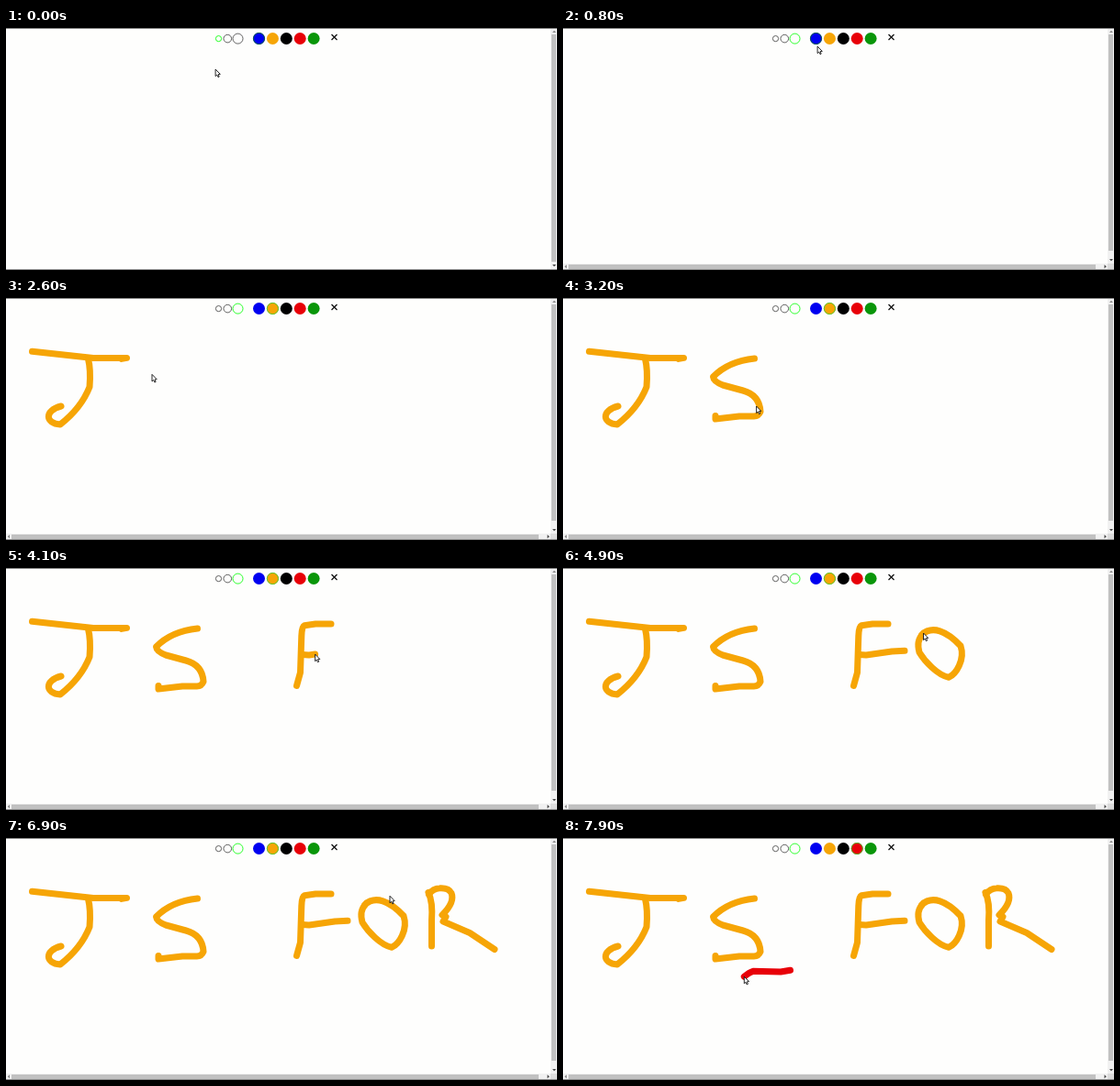
These frames come from a looping animation (600 px wide and 264 px high, 8000 ms). An HTML page with a canvas:

```html
<!DOCTYPE html>
<html lang="en">
<head>
<meta charset="utf-8">
<title>Drawing board</title>
<style>
html, body { margin: 0; width: 100%; height: 100%; overflow: hidden; background: #fefefd; }
canvas { display: block; width: 600px; height: 264px; }
</style>
</head>
<body>
<canvas id="board" width="600" height="264"></canvas>
<script>
const ctx = document.getElementById('board').getContext('2d');
const LOOP = 8000, STEP = 100;
const LARGE_AT = 500, ORANGE_AT = 1200, RED_AT = 7300;
const ORANGE = '#f6a506', RED = '#e80008', LIME = '#1f1';
const COLORS = ['#0000f0', ORANGE, '#000', RED, '#0a960a'];
const ARROW = new Path2D('M0 0V7.6L1.7 6.1 2.9 8.7 4.1 8.1 3 5.6 5.2 5.4Z');
const CROSS = new Path2D('M354.5 7l6 6m0-6l-6 6');

// The pointer follows a path from start to end; with a colour it leaves ink
function stroke(start, end, d, color) {
  const path = document.createElementNS('http://www.w3.org/2000/svg', 'path');
  path.setAttribute('d', d);
  return { start, end, color, path, shape: new Path2D(d), length: path.getTotalLength() };
}
const hover = (t, x, y) => stroke(t, t, `M${x} ${y}h.1`);

const moves = [
  hover(0, 228, 45),
  hover(LARGE_AT, 252, 13),
  hover(800, 277, 20),
  hover(1000, 321, 20),
  hover(ORANGE_AT, 290, 13),
  stroke(1450, 1800, 'M28.5 58.3L95 65.4H131.5L126 66.4', ORANGE),
  stroke(2000, 2500, 'M89.5 66.5Q92.5 78 91 97Q82 120 59 138C43 137 41 123 60 118', ORANGE),
  stroke(2650, 3100, 'M208.5 66Q180 69 163.5 86Q164 91 174 95L196 101Q214 106 215 124Q213 129 208 129H192L166 132V128.5', ORANGE),
  hover(3200, 210.5, 118),
  stroke(3600, 3950, 'M354 61H337L325 62.7Q322 64 321.8 74L320.5 114 316.5 128.5', ORANGE),
  stroke(4050, 4230, 'M323 94.5L330 95 358 91 372 90.3', ORANGE),
  stroke(4300, 4900, 'M390.5 73C402 62 418 69 433 85C438 100 428 116 420 119.3C408 117 394 102 388 92C386 84 386 78 392.5 71', ORANGE),
  stroke(5050, 5380, 'M460 59.5Q465 70 463.5 90V118', ORANGE),
  stroke(5600, 6700, 'M460.5 61.5Q465 55 472 54.7Q482 54 485 60Q489 70 475 84L479 86 476 91 505 103.5 532 121.5', ORANGE),
  hover(7100, 304, 5),
  hover(7200, 342, 10),
  hover(RED_AT, 320, 13),
  stroke(7600, 7900, 'M247.5 144.3L237 146 207 145.3Q203 146.5 197.3 151.2', RED)
];

const progress = (m, t) => t >= m.end ? 1 : (t - m.start) / (m.end - m.start);

function rect(x, y, w, h, color) {
  ctx.fillStyle = color;
  ctx.fillRect(x, y, w, h);
}

function disc(x, y, r, fill, line) {
  ctx.beginPath();
  ctx.arc(x, y, r, 0, Math.PI * 2);
  if (fill) { ctx.fillStyle = fill; ctx.fill(); }
  if (line) { ctx.strokeStyle = line; ctx.lineWidth = 0.9; ctx.stroke(); }
}

// Scrollbar arrow pointing along (dx, dy)
function marker(x, y, dx, dy, color) {
  ctx.beginPath();
  ctx.moveTo(x + dx * 1.3, y + dy * 1.3);
  ctx.lineTo(x - dx + dy * 2, y - dy + dx * 2);
  ctx.lineTo(x - dx - dy * 2, y - dy - dx * 2);
  ctx.fillStyle = color;
  ctx.fill();
}

function drawInk(t) {
  ctx.save();
  ctx.lineWidth = 7;
  ctx.lineCap = ctx.lineJoin = 'round';
  for (const m of moves) {
    if (!m.color || t < m.start) continue;
    const share = progress(m, t);
    ctx.setLineDash(share < 1 ? [m.length * share, m.length * 2] : []);
    ctx.strokeStyle = m.color;
    ctx.stroke(m.shape);
  }
  ctx.restore();
}

function pointer(t) {
  const n = moves.findLastIndex(m => m.start <= t);
  const now = moves[n], next = moves[n + 1];
  const a = now.path.getPointAtLength(now.length * progress(now, t));
  if (t <= now.end || !next) return [a.x, a.y];
  const b = next.path.getPointAtLength(0);
  const k = (t - now.end) / (next.start - now.end);
  return [a.x + (b.x - a.x) * k, a.y + (b.y - a.y) * k];
}

function drawTools(t) {
  const size = t < LARGE_AT ? 0 : 2;
  const color = t < ORANGE_AT ? 0 : t < RED_AT ? 1 : 3;
  for (let i = 0; i < 3; i++) {
    disc(231.5 + i * (9 + i * 0.75), 11.6, 3.1 + i * 1.2, null, i === size ? LIME : '#505050');
  }
  COLORS.forEach((fill, i) => {
    const x = 275.5 + i * 14.9;
    disc(x, 11.5, 6.5, fill);
    if (i === color) disc(x, 11.5, 6.1, null, i ? '#4c3' : '#086a30');
  });
  ctx.lineWidth = 1.3;
  ctx.strokeStyle = '#111';
  ctx.stroke(CROSS);
}

function drawFrame(t) {
  const wide = t >= LARGE_AT, bottom = wide ? 257 : 263;
  rect(593, 1, 7, 262, '#f1f1f1');
  rect(594, 7, 5, bottom - 21 + (wide ? 0 : 6), '#c1c1c1');
  marker(597, 4, 0, -1, '#888');
  marker(597, bottom - 4, 0, 1, '#444');
  if (wide) {
    rect(0, 257, 593, 6, '#f1f1f1');
    rect(6, 258, 574, 5, '#c1c1c1');
    rect(593, 257, 7, 6, '#dcdcdc');
    marker(3, 260.3, -1, 0, '#888');
    marker(590.5, 260.3, 1, 0, '#444');
  }
  rect(0, 0, 600, 1, '#858585');
  rect(0, 263, 600, 1, '#8c8c8c');
}

function drawPointer(t) {
  ctx.save();
  ctx.translate(...pointer(t));
  ctx.fillStyle = '#fff';
  ctx.fill(ARROW);
  ctx.lineWidth = 0.9;
  ctx.strokeStyle = '#111';
  ctx.stroke(ARROW);
  ctx.restore();
}

const origin = performance.now();

function render() {
  const t = Math.floor((performance.now() - origin) % LOOP / STEP) * STEP;
  rect(0, 0, 600, 264, '#fefefd');
  drawInk(t);
  drawTools(t);
  drawFrame(t);
  drawPointer(t);
  requestAnimationFrame(render);
}
render();
</script>
</body>
</html>
```
